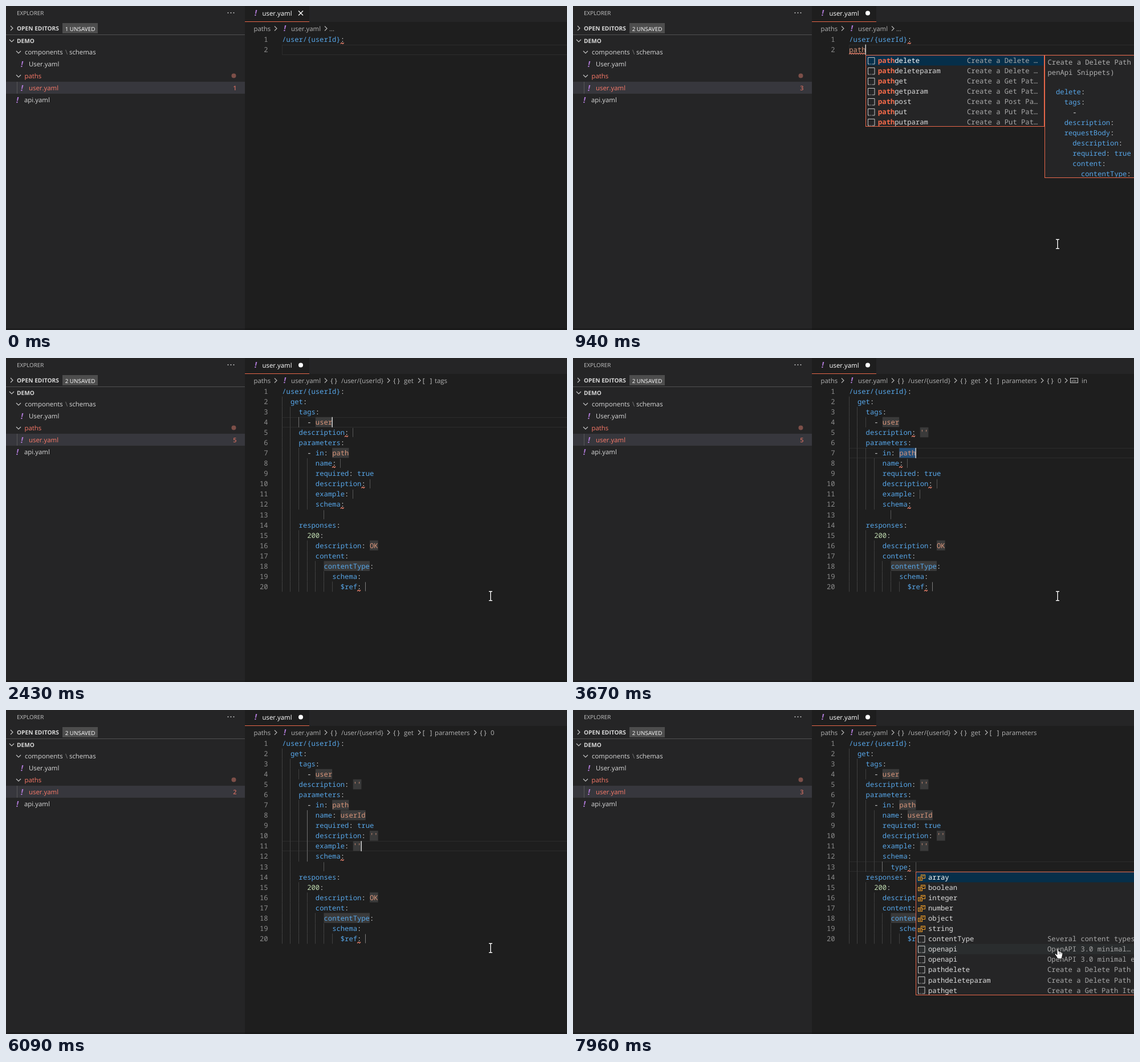
An HTML page with a canvas that plays this animation: 984 by 569 pixels, repeating every 8000 ms.

```html
<!DOCTYPE html>
<html lang="en">
<head>
<meta charset="utf-8">
<title>YAML snippets</title>
<style>
html, body { margin: 0; width: 100%; height: 100%; overflow: hidden; background: #1e1e1e; }
canvas { display: block; }
</style>
</head>
<body>
<canvas id="stage" width="984" height="569"></canvas>
<script>
const ctx = document.getElementById('stage').getContext('2d');
const LOOP = 8000, W = 984, H = 569;
const X0 = 484.3, TOP = 49.6, ROW = 18.05, CW = 7.32;
const MONO_FACE = '12.2px "Noto Sans Mono", monospace';
const MONO = '500 ' + MONO_FACE;
const UI = '500 11.4px "Open Sans", sans-serif';
const SMALL = '500 9.9px "Open Sans", sans-serif';
const BOLD = '700 10.2px "Open Sans", sans-serif';
const ACCENT = '#e8674a', ERROR = '#f48771', RED = '#fb7a69';
const KEY = '#57a6e8', STR = '#d9967b', PLAIN = '#dcdcdc', LABEL = '#d8d8d8', ICON = '#c5c5c5';

const colX = col => X0 + col * CW;
const pixelX = col => Math.floor(colX(col));
const lineTop = line => TOP + (line - 1) * ROW;

function text(str, x, y, color, font = UI, align = 'left') {
  ctx.font = font;
  ctx.fillStyle = color;
  ctx.textAlign = align;
  ctx.fillText(str, x, y);
}
function rect(x, y, w, h, color) {
  ctx.fillStyle = color;
  ctx.fillRect(x, y, w, h);
}
function frame(x, y, w, h, color) {
  ctx.strokeStyle = color;
  ctx.lineWidth = 1;
  ctx.strokeRect(x + .5, y + .5, w - 1, h - 1);
}
function path(points, color, width = 1) {
  ctx.beginPath();
  points.forEach(([x, y]) => ctx.lineTo(x, y));
  ctx.strokeStyle = color;
  ctx.lineWidth = width;
  ctx.stroke();
}
function dot(x, y, r, color) {
  ctx.beginPath();
  ctx.arc(x, y, r, 0, 7);
  ctx.fillStyle = color;
  ctx.fill();
}
const chevronRight = (x, y, color) => path([[x - 2, y - 4], [x + 2, y], [x - 2, y + 4]], color, 1.2);
const chevronDown = (x, y) => path([[x - 4, y - 2], [x, y + 2], [x + 4, y - 2]], ICON, 1.2);
const yamlMark = (x, y) => text('!', x, y, '#b07ad8', 'italic 700 14px "Open Sans", sans-serif', 'center');

function squiggle(x, y, w) {
  const points = [];
  for (let i = 0; i <= w; i += 2) points.push([x + i, y + (i % 4 ? -1 : 1)]);
  path(points, ERROR, 1.1);
}

// One line of YAML, split in dash, key and value.
function yaml(line, x, y) {
  const [, space, dash, key, colon, gap, value] = /^(\s*)(- ?)?(?:([^:]+)(:))?(\s*)(.*)$/.exec(line);
  let col = 0;
  const put = (part = '', color) => {
    if (part.trim()) text(part, x + col * CW, y, color, MONO);
    col += part.length;
  };
  put(space);
  put(dash, PLAIN);
  put(key, /^\d+$/.test(key) ? '#c0dab0' : KEY);
  put(colon, PLAIN);
  put(gap);
  put(value, value === 'true' ? KEY : STR);
}

const snip = (label, detail = '') => ['snippet', label, detail];
const pathRows = [
  snip('pathdelete', 'Create a Delete …'), snip('pathdeleteparam', 'Create a Delete …'),
  snip('pathget', 'Create a Get Pat…'), snip('pathgetparam', 'Create a Get Pat…'),
  snip('pathpost', 'Create a Post Pa…'), snip('pathput', 'Create a Put Pat…'),
  snip('pathputparam', 'Create a Put Pat…')
];
const contentRow = snip('contentType', 'Several content types…');
const deleteDoc = ['Create a Delete Path Item (O', 'penApi Snippets)', 'delete:', '  tags:', '    -',
  '  description:', '  requestBody:', '    description:', '    required: true', '    content:', '      contentType:'];
const getDoc = ['Create a Get Path Item (Open', 'Api Snippets)', 'get:', '  tags:', '    -',
  '  description:', '  responses:', '    200:', '      description: OK', '      content:', '        contentType:'];
const paramDoc = ['Create a Get Path Item with', 'parameters (OpenApi Snippets)', 'get:', '  tags:', '    -',
  '  description:', '  parameters:', '    - in: path', '      name:', '      required: true', '      description:'];

const pathList = match => ({ rows: pathRows, match, sel: 0, doc: deleteDoc, w: 314, detailX: 178 });
const getList = (sel, doc) => ({ rows: pathRows.slice(2, 4), match: 'pathg', sel, doc, w: 314, detailX: 178 });
const wideList = (rows, match, hover) => ({ rows, match, sel: 0, hover, w: 409, detailX: 231 });
const props = (...names) => names.map(name => ['property', name, '']);
const typeRows = hover => [
  ...['array', 'boolean', 'integer', 'number', 'object', 'string'].map(name => ['value', name, '']),
  contentRow,
  snip('openapi', hover ? 'OpenAPI 3.0 minimal…' : 'OpenAPI 3.0 minimal e…'),
  snip('openapi', 'OpenAPI 3.0 minimal e…'),
  snip('pathdelete', 'Create a Delete Path …'), snip('pathdeleteparam', 'Create a Delete Path …'),
  snip('pathget', 'Create a Get Path Ite…')
];

const base = ['{}/user/{userId}', '{}get'];
const inParams = [...base, '[]parameters'];
const inItem = [...inParams, '{}0'];

const start = {
  full: false, word: '', tag: '', desc: '', name: '', paramDesc: '', example: '', type: '«»',
  line: 2, col: 0, caret: false, select: 0, bad: [1], crumbs: null, count: 1, unsaved: 1,
  list: null, mouse: null, hand: false
};
// Each step changes a few values from its time on.
const steps = [
  [150, { mouse: [862, 552] }],
  [230, { mouse: [854, 470] }],
  [310, { mouse: [850, 418], caret: true }],
  [400, { word: 'p', col: 1, unsaved: 2 }],
  [480, { list: pathList('p') }],
  [600, { word: 'pa', col: 2, list: pathList('pa'), bad: [1, 2] }],
  [710, { count: 3 }],
  [790, { word: 'pat', col: 3, list: pathList('pat') }],
  [880, { word: 'path', col: 4, list: pathList('path') }],
  [990, { word: 'pathg', col: 5, list: getList(0, getDoc) }],
  [1100, { count: 5 }],
  [1340, { list: getList(1, paramDoc), caret: false }],
  [1640, { full: true, list: null, line: 4, col: 8, caret: true, bad: [] }],
  [1740, { crumbs: [...base, '[]tags'] }],
  [1840, { bad: [5, 8, 10, 12, 20] }],
  [1950, { tag: 'u', col: 9 }],
  [2050, { tag: 'us', col: 10 }],
  [2150, { tag: 'use', col: 11 }],
  [2250, { tag: 'user', col: 12 }],
  [2810, { line: 5, col: 17 }],
  [2980, { crumbs: [...base, 'abcdescription'] }],
  [3150, { desc: "''", col: 18 }],
  [3320, { col: 19 }],
  [3490, { line: 7, col: 16, select: 7 }],
  [3660, { crumbs: [...inItem, 'abcin'] }],
  [3900, { line: 8, col: 14, select: 0, bad: [8, 10, 12, 20], count: 4 }],
  [4000, { crumbs: inItem }],
  [4250, { name: 'u', col: 15 }],
  [4350, { name: 'us', col: 16 }],
  [4450, { name: 'use', col: 17 }],
  [4580, { name: 'user', col: 18 }],
  [4770, { name: 'userI', col: 19 }],
  [5010, { name: 'userId', col: 20 }],
  [5160, { bad: [10, 12, 20], count: 3 }],
  [5310, { line: 10, col: 21 }],
  [5460, { paramDesc: "''", col: 23 }],
  [5620, { line: 11, col: 17, bad: [12, 20], count: 2 }],
  [5940, { example: "''", col: 18 }],
  [6070, { col: 19 }],
  [6200, { line: 13, col: 10 }],
  [6330, { crumbs: [...inItem, 'abcschema'] }],
  [6470, { type: '«t»', col: 11 }],
  [6600, { list: wideList([...props('type', 'title', 'format', 'not', 'pattern', 'default'), contentRow], 't') }],
  [6740, { type: '«ty»', col: 12, list: wideList([...props('type'), contentRow], 'ty'), bad: [13, 20] }],
  [7020, { caret: false }],
  [7420, { type: 'type: «»', col: 16, list: null, caret: true, bad: [20] }],
  [7720, { list: wideList(typeRows(false), '') }],
  [7800, { hand: true, list: wideList(typeRows(true), '', 7) }],
  [7880, { crumbs: inParams, caret: false }],
  [7960, { bad: [13, 20], count: 3 }]
];
const stateAt = t => Object.assign({}, start, ...steps.filter(([at]) => at <= t).map(([, change]) => change));

const source = s => !s.full ? ['/user/{userId}:', s.word] : [
  '/user/{userId}:', '  get:', '    tags:', `      - «${s.tag}»`,
  `    description: «${s.desc}»`, '    parameters:', '      - in: «path»',
  `        name: «${s.name}»`, '        required: true', `        description: «${s.paramDesc}»`,
  `        example: «${s.example}»`, '        schema:', `          ${s.type}`,
  '    responses:', '      200:', '        description: «OK»', '        content:',
  '          «contentType»:', '            schema:', '              $ref: «»'
];

function drawSidebar(s) {
  rect(0, 0, 419, H, '#252526');
  text('EXPLORER', 19, 16, '#c4c4c4', SMALL);
  [389.5, 394.5, 399.5].forEach(x => dot(x, 12, 1, ICON));
  chevronRight(10, 39, ICON);
  text('OPEN EDITORS', 19, 43, LABEL, BOLD);
  rect(99, 30, 62, 18, '#4d4d4d');
  text(`${s.unsaved} UNSAVED`, 130, 43.5, '#ffffff', SMALL, 'center');
  rect(0, 50, 419, 1, '#505051');
  chevronDown(10, 61);
  text('DEMO', 19, 65, LABEL, BOLD);

  chevronDown(22, 81);
  text('components', 33, 85, LABEL);
  text('\\', 104, 85, '#7c7c7c');
  text('schemas', 111, 85, LABEL);
  yamlMark(28, 107);
  text('User.yaml', 40, 106, LABEL);
  chevronDown(22, 123);
  text('paths', 32.5, 127, RED);
  dot(399.5, 122.5, 4, '#7d4f48');
  rect(0, 133, 419, 21, '#37373d');
  rect(19, 133, 1, 21, '#585858');
  yamlMark(28, 149);
  text('user.yaml', 40, 148, RED);
  text(s.count, 401.5, 148, '#cc6c60', '600 11px "Open Sans", sans-serif', 'center');
  yamlMark(20, 170);
  text('api.yaml', 32, 169, LABEL);
}

function crumbIcon(kind, x) {
  if (kind === 'abc') {
    frame(x - 7, 35, 14, 9, ICON);
    text('abc', x, 41.5, ICON, '6px "Open Sans", sans-serif', 'center');
  } else {
    text(kind.split('').join(kind === '[]' ? '   ' : ' '), x, 43.5, ICON, UI, 'center');
  }
}

function drawHeader(s) {
  rect(419, 0, W - 419, 28, '#252526');
  rect(419, 0, 113, 28, '#1e1e1e');
  rect(419, 27, 113, 1, ACCENT);
  yamlMark(438, 17);
  text('user.yaml', 449.5, 17, '#ffffff');
  if (s.unsaved > 1) {
    dot(517, 12.5, 4, '#ffffff');
  } else {
    path([[513, 8.5], [521, 16.5]], '#ffffff', 1.2);
    path([[521, 8.5], [513, 16.5]], '#ffffff', 1.2);
  }
  const gray = '#b2b2b2';
  text('paths', 434.5, 43.5, gray);
  chevronRight(473, 39.5, gray);
  yamlMark(489, 44);
  text('user.yaml', 500, 43.5, gray);
  chevronRight(561, 39.5, gray);
  if (!s.crumbs) return text('...', 567, 43.5, gray);
  const places = [588, 698, 752, 850, 892];
  s.crumbs.forEach((crumb, i) => {
    const [, kind, label] = /^(\{\}|\[\]|abc)(.*)$/.exec(crumb);
    const x = places[i];
    if (i) chevronRight(x - 27, 39.5, gray);
    crumbIcon(kind, x - 13);
    text(label, x, 43.5, gray);
  });
}

function isActiveGuide(s, line, col) {
  if (s.line === 4) return line === 4 && col === 4;
  if (s.line === 13) return line === 13 && col === 8;
  return s.line >= 8 && line >= 8 && line <= 12 && col === 6;
}

function drawEditor(s) {
  frame(484, Math.round(lineTop(s.line)), W - 483, 18, '#2c2c2c');
  source(s).forEach((raw, i) => {
    const line = i + 1, top = lineTop(line), y = Math.round(top + 13.3);
    const plain = raw.replace(/[«»]/g, '');
    text(line, 459.5, y, '#8c8c8c', MONO, 'right');

    const indent = plain.trim() ? plain.search(/\S/) : s.full ? 4 : 0;
    for (let col = 0; col < indent; col += 2) {
      rect(pixelX(col), top, 1, ROW, isActiveGuide(s, line, col) ? '#707070' : '#404040');
    }
    const open = raw.indexOf('«');
    if (open >= 0) {
      const length = raw.indexOf('»') - open - 1;
      if (length) rect(colX(open), top, length * CW, 17.5, s.select === line ? '#264f78' : '#3a3a3a');
      else rect(pixelX(open), top + 1, 1, 16, line === 20 ? '#7c7c7c' : '#565656');
    }
    yaml(plain, X0, y);

    if (s.bad.includes(line)) {
      const colon = plain.lastIndexOf(':');
      const from = colon >= 0 ? colon : plain.search(/\S/);
      const length = colon >= 0 ? 1 : plain.trim().length;
      squiggle(colX(from), y + 2.5, length * CW);
    }
  });
  if (s.caret) rect(pixelX(s.col) - .5, lineTop(s.line), 1.5, 18, '#d0d0d0');
}

const icons = {
  snippet(x, y) {
    path([[x + 3, y + 12], [x + .5, y + 12], [x + .5, y + .5], [x + 12, y + .5], [x + 12, y + 12], [x + 9, y + 12]], ICON);
    rect(x + 4, y + 11.5, 1.5, 1, ICON);
    rect(x + 7, y + 11.5, 1.5, 1, ICON);
  },
  property(x, y) {
    path([[x + 1, y + 11.5], [x + 6, y + 6.5]], ICON, 3);
    path([[x + 1.5, y + 11], [x + 6, y + 6.5]], '#252526', 1);
    ctx.beginPath();
    ctx.arc(x + 8.5, y + 4, 3.2, -.2, 4.9);
    ctx.strokeStyle = ICON;
    ctx.lineWidth = 1.3;
    ctx.stroke();
  },
  value(x, y) {
    frame(x + 5, y + 1, 8, 7, '#ee9d28');
    rect(x + 7, y + 3, 4, 1, '#ee9d28');
    rect(x, y + 5, 8, 7, '#252526');
    frame(x, y + 5, 8, 7, '#ee9d28');
    rect(x + 2, y + 7, 4, 1, '#ee9d28');
    rect(x + 2, y + 9, 4, 1, '#ee9d28');
  }
};

function drawLabel(label, match, x, y, color) {
  const at = match ? label.toLowerCase().indexOf(match) : -1;
  if (at < 0) return text(label, x, y, color, MONO);
  const end = at + match.length;
  text(label.slice(0, at), x, y, color, MONO);
  text(label.slice(at, end), x + at * CW, y, '#f86c4b', '700 ' + MONO_FACE);
  text(label.slice(end), x + end * CW, y, color, MONO);
}

function drawDoc(doc, x, y) {
  const h = 12 * ROW;
  rect(x, y, W - x, h, '#252526');
  frame(x, y, 300, Math.round(h) - 1, ACCENT);
  ctx.save();
  ctx.beginPath();
  ctx.rect(x, y, W - x, h - 2);
  ctx.clip();
  doc.forEach((line, i) => {
    if (i < 2) text(line, x + 5.5, Math.round(y + 17 + i * ROW), '#b0b0b0', MONO);
    else yaml(line, x + 20, Math.round(y + 68.5 + (i - 2) * ROW));
  });
  ctx.restore();
}

function drawList(s) {
  const { rows, match, sel, hover, w, detailX, doc } = s.list;
  const x = pixelX(s.col), y = Math.round(lineTop(s.line + 1) + .2);
  const h = Math.round(rows.length * ROW);
  rect(x, y, w, h, '#252526');
  rows.forEach(([icon, label, detail], i) => {
    const top = y + .5 + i * ROW, baseline = Math.round(top + 13.5);
    if (i === sel) rect(x, top, w, ROW, '#062f4a');
    if (i === hover) rect(x, top, w, ROW, '#2a2d2e');
    icons[icon](x + 4, Math.round(top + 3));
    drawLabel(label, match, x + 22, baseline, i === sel ? '#ffffff' : PLAIN);
    text(detail, x + detailX, baseline, '#a8a8a8', MONO);
  });
  frame(x, y, w, h, ACCENT);
  if (doc) drawDoc(doc, x + w, y);
}

function drawMouse({ mouse, hand }) {
  if (!mouse) return;
  const [x, y] = mouse;
  if (!hand) {
    for (const [color, width] of [['#000000', 3], ['#ffffff', 1.5]]) {
      path([[x, y - 8], [x, y + 8]], color, width);
      [-8, 8].forEach(d => path([[x - 3, y + d], [x + 3, y + d]], color, width));
    }
    return;
  }
  const outline = [[-1, 0], [1, 0], [2, 6], [4, 6], [6, 7], [8, 8], [9, 10], [8, 15], [7, 19],
    [0, 19], [-2, 15], [-5, 11], [-4, 9], [-1, 12]];
  ctx.beginPath();
  outline.forEach(([dx, dy]) => ctx.lineTo(x + dx, y + dy));
  ctx.closePath();
  ctx.fillStyle = '#ffffff';
  ctx.fill();
  ctx.strokeStyle = '#111111';
  ctx.lineWidth = 1;
  ctx.stroke();
  [3, 6].forEach(dx => path([[x + dx, y + 7], [x + dx, y + 11]], '#333333', .8));
}

function draw(now) {
  const s = stateAt(now % LOOP);
  ctx.textRendering = 'geometricPrecision';
  rect(0, 0, W, H, '#1e1e1e');
  drawSidebar(s);
  drawHeader(s);
  drawEditor(s);
  if (s.list) drawList(s);
  rect(0, 566, W, 3, 'rgba(0, 0, 0, .18)');
  drawMouse(s);
  requestAnimationFrame(draw);
}
requestAnimationFrame(draw);
</script>
</body>
</html>
```
